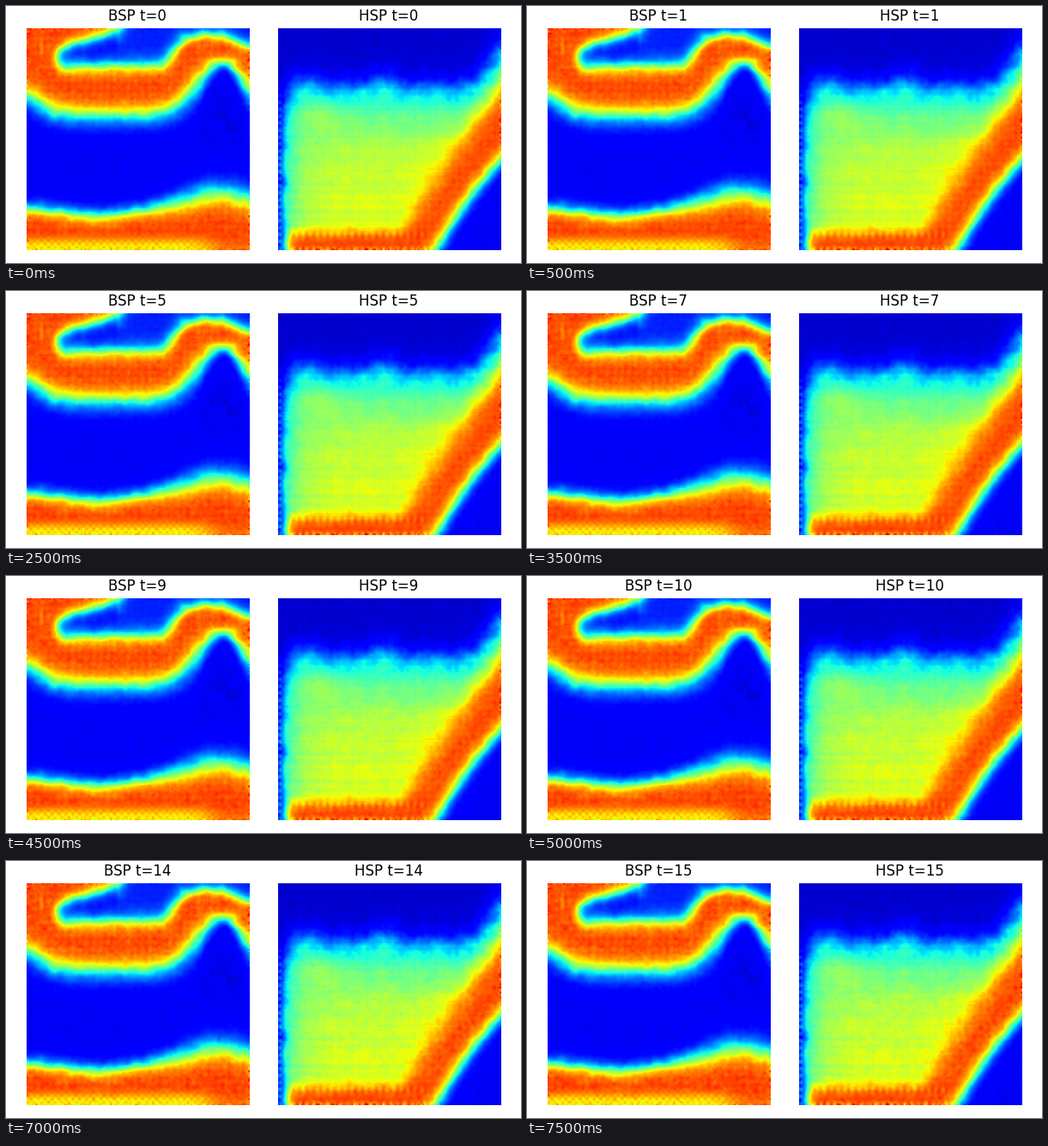
These frames come from a looping animation (600x300 px, 8 s). A matplotlib script:

```python
import numpy as np
import matplotlib.pyplot as plt
from matplotlib.animation import FuncAnimation

W, H, N = 600, 300, 128
SIZE, TOP = 259.5, 25.5
LEFT_X, RIGHT_X = 24.2, 317.0
FRAMES, STEP = 16, 500
COLD, HOT = 0.105, 0.84

I, J = np.meshgrid(np.arange(N), np.arange(N))
EDGE = np.minimum.reduce([I, J, N - 1 - I, N - 1 - J])
LATTICE = np.cos(np.pi * I / 2) + np.cos(np.pi * J / 2)


def sigmoid(u):
    return 1 / (1 + np.exp(-np.clip(u, -40, 40)))


def ramp(u, a, b):
    u = np.clip((u - a) / (b - a), 0, 1)
    return u * u * (3 - 2 * u)


def bump(u, centre, width):
    return np.exp(-((u - centre) / width) ** 2)


def spot(X, Y, cx, cy, rx, ry):
    return bump(X, cx, rx) * bump(Y, cy, ry)


def stage_grid(x0):
    return x0 + (I + 0.5) * SIZE / N, TOP + (J + 0.5) * SIZE / N


def depth(curve, Y):
    """Approximate distance below a curve given as one height per column."""
    slope = np.gradient(curve, SIZE / N, axis=1)
    return (Y - curve) / np.sqrt(1 + slope ** 2)


def blobs(rng, n):
    """Smooth noise with unit deviation."""
    k = np.hanning(n + 2)[1:-1]
    a = rng.standard_normal((N, N))
    for axis in (0, 1):
        a = np.apply_along_axis(np.convolve, axis, a, k, "same")
    return a / a.std()


def texture(rng):
    return 0.45 * blobs(rng, 3) + 0.35 * rng.standard_normal((N, N)) + 0.3 * LATTICE


def left_field(rng):
    X, Y = stage_grid(LEFT_X)
    shore = 128 - 24 * bump(X, 18, 32) - 62 * bump(X, 253, np.where(X < 253, 42, 34))
    bank = 236 + 9 * bump(X, 105, 50) - 18 * bump(X, 248, 48)
    hole_low = 34 + 37 * sigmoid((196 - X) / 7) + 13 * ramp(X, 245, 285)
    hole_top = 48 - 0.32 * (X - 68) - np.maximum(X - 130, 0)

    wob = 0.7 * blobs(rng, 9)
    sea = sigmoid((depth(shore, Y) + wob) / (6.8 - 3.3 * bump(X, 258, 32)))
    sand = sigmoid((depth(bank, Y) + wob) / (4.7 + 3.3 * ramp(X, 150, 240)))
    s = 5 - 1.3 * ramp(X, 170, 220)
    gap = (sigmoid((wob - depth(hole_low, Y)) / s)
           * sigmoid((depth(hole_top, Y) + wob) / 4.2) * sigmoid((X - 60) / 3.2))
    hot = np.maximum((1 - sea) * (1 - gap), sand)
    v = COLD + (HOT - COLD) * hot

    tex = texture(rng)
    v += (0.006 + 0.014 * hot) * tex
    v += 0.05 * gap * ramp(X, 95, 150) * (1 - sea)
    v -= 0.025 * spot(X, Y, 253, 140, 17, 22) * (blobs(rng, 5) > 0)
    # the lower rim cools into a yellow checker
    rim = ramp(Y, 263, 283) * (1 - 0.75 * ramp(X, 210, 260))
    v -= rim * (0.18 + 0.05 * np.cos(np.pi * I / 2) * np.cos(np.pi * J / 2) + 0.04 * tex)
    v -= 0.035 * spot(X, Y, 42, 45, 9, 20) * (1 + np.cos(np.pi * I / 2)) * (1 - gap)
    v += np.exp(-EDGE / 1.2) * 0.03 * rng.standard_normal((N, N)) * (0.25 + hot)
    return v, hot


def right_field(rng):
    X, Y = stage_grid(RIGHT_X)
    back = 577 - X
    ridge = (96 + 10 * bump(X, 317, 14) - 6 * bump(X, 345, 18)
             - 10 * bump(X, 440, 16) - 50 * bump(X, 590, 32))
    lava = 265 - 8 * np.logaddexp(0, (178 - 1.55 * back) / 8)
    bay = 178 + 1.05 * back + 0.0045 * back ** 2

    wob = 0.9 * blobs(rng, 9)
    land = sigmoid((depth(ridge, Y) + 2 * wob) / 7.6) * sigmoid((X - 323.5 + wob) / 3.4)
    hot = (sigmoid((depth(lava, Y) + wob) / (3.8 + 3.2 * ramp(X, 455, 500)))
           * sigmoid((X - 325) / 3))
    water = sigmoid((depth(bay, Y) + 0.5 * wob) / 4.4)

    plain = 0.42 + 0.1 * ramp(Y, 95, 175) + 0.03 * ramp(Y, 170, 250)
    plain += 0.06 * ramp(X, 325, 400) * ramp(Y, 105, 190)
    plain += 0.035 * ramp(X, 440, 500) * ramp(Y, 130, 190)
    plain -= 0.06 * (1 - ramp(X, 328, 352))
    plain += 0.06 * spot(X, Y, 365, 125, 24, 24)
    plain += 0.008 * np.cos(2 * np.pi * Y / 32.4) + 0.005 * blobs(rng, 11)
    plain += 0.007 * rng.standard_normal((N, 1))

    v = 0.07 + (plain + (HOT - plain) * hot - 0.07) * land
    v += (COLD - v) * water
    live = land * (1 - water)
    v += (0.008 + 0.007 * live) * texture(rng)
    v += 0.03 * bump(Y, 267, 4) * (X < 490) * np.cos(np.pi * I / 2) * live
    v -= 0.05 * ramp(Y, 278, 284) * (1 + np.cos(np.pi * I / 2)) * live
    v += np.exp(-EDGE / 1.2) * 0.03 * rng.standard_normal((N, N)) * (0.3 + live)
    v += 0.08 * (I < 2) * ((J // 2) % 2) * ramp(Y, 80, 120)
    return v, live


class Panel:
    def __init__(self, fig, rng, name, x, field):
        self.name = name
        self.base, weight = field(rng)
        self.drift = (0.002 + 0.006 * weight) * blobs(rng, 3)
        ax = fig.add_axes([x / W, 1 - (TOP + SIZE) / H, SIZE / W, SIZE / H])
        ax.axis("off")
        self.image = ax.imshow(self.base, cmap="jet", vmin=0, vmax=1, aspect="auto")
        self.title = ax.set_title("", fontsize=12, pad=6, x=0.497)

    def show(self, t):
        self.image.set_data(self.base + self.drift * t / (FRAMES - 1))
        self.title.set_text(f"{self.name} t={t}")
        return self.image, self.title


plt.rcParams["font.family"] = "DejaVu Sans"
fig = plt.figure(figsize=(W / 100, H / 100), dpi=100, facecolor="white")
rng = np.random.RandomState(7)
panels = [Panel(fig, rng, "BSP", LEFT_X, left_field),
          Panel(fig, rng, "HSP", RIGHT_X, right_field)]


def update(t):
    return [artist for panel in panels for artist in panel.show(t)]


anim = FuncAnimation(fig, update, frames=FRAMES, interval=STEP,
                     repeat=True, repeat_delay=0, blit=False)
plt.show()
```
